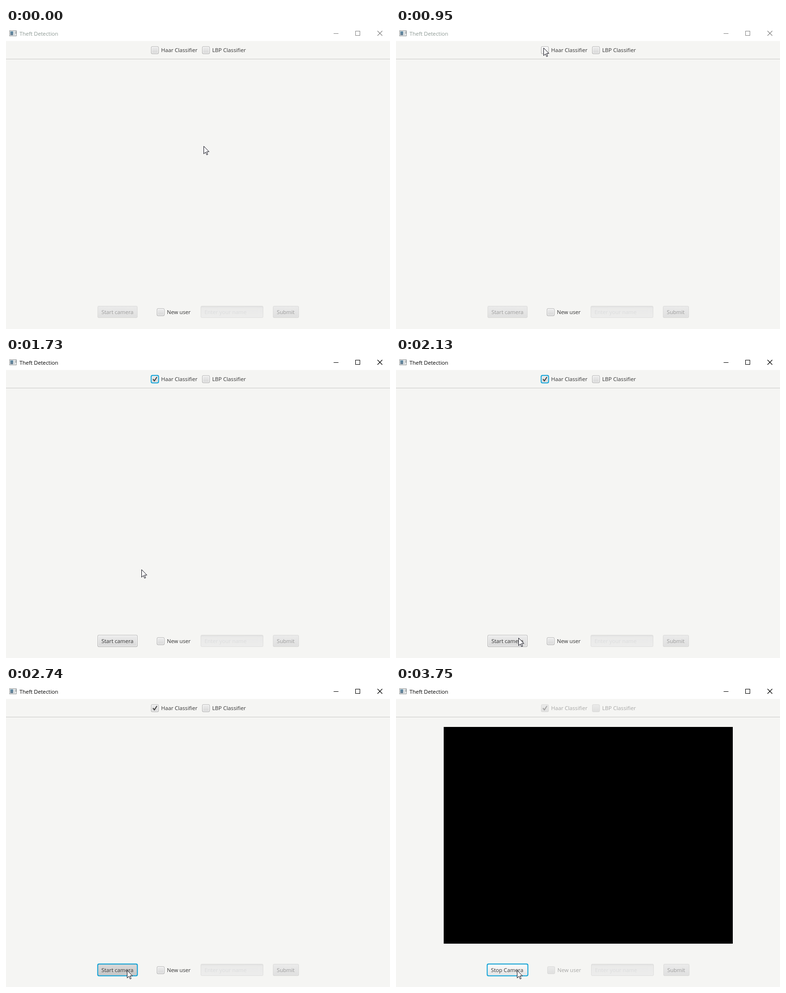
Animation, 797 px wide and 625 px high, one loop 3830 ms. Source, as an HTML page with a canvas:

```html
<!DOCTYPE html>
<html lang="en">
<head>
<meta charset="utf-8">
<title>Theft Detection</title>
<style>
html, body { margin: 0; width: 100%; height: 100%; overflow: hidden; background: #f5f5f3; }
canvas { display: block; }
</style>
</head>
<body>
<canvas id="stage" width="797" height="625"></canvas>
<script>
const ctx = document.getElementById('stage').getContext('2d');
const LOOP = 3830;
const FONT = '11.2px "Open Sans", "Noto Sans", sans-serif';
const INK = '#333333';
const FOCUS = '#0a9fd4';

// Pointer samples: start time, x, y
const POINTER = [
  [0, 410, 245], [80, 405, 234], [160, 387, 196], [230, 360, 142],
  [310, 331, 88], [390, 314, 53], [470, 308, 39],
  [870, 307, 40], [950, 306, 41],
  [1420, 303, 62], [1500, 288, 150], [1570, 275, 268], [1650, 276, 368],
  [1730, 281, 441], [1810, 281, 483], [1890, 279, 508],
  [1970, 272, 539], [2050, 262, 566], [2130, 254, 583], [2200, 251, 590]
];

function pointerAt(t) {
  let spot = POINTER[0];
  for (const p of POINTER) if (p[0] <= t) spot = p;
  return { x: spot[1], y: spot[2] };
}

function text(str, x, y, color = INK) {
  ctx.font = FONT;
  ctx.fillStyle = color;
  ctx.fillText(str, x, y);
}

function line(color, width, points) {
  ctx.strokeStyle = color;
  ctx.lineWidth = width;
  ctx.beginPath();
  points.forEach(([x, y]) => ctx.lineTo(x, y));
  ctx.stroke();
}

function roundBox(x, y, w, h, r, fill) {
  ctx.fillStyle = fill;
  ctx.beginPath();
  ctx.roundRect(x, y, w, h, r);
  ctx.fill();
}

function shade(y, h, top, bottom) {
  const g = ctx.createLinearGradient(0, y, 0, y + h);
  g.addColorStop(0, top);
  g.addColorStop(1, bottom);
  return g;
}

function faded(off, draw) {
  ctx.globalAlpha = off ? 0.4 : 1;
  draw();
  ctx.globalAlpha = 1;
}

// Shared bevelled body of buttons and check boxes
function bevel(x, y, w, h, { focus, hover, pressed }) {
  if (focus) {
    roundBox(x - 1, y - 1, w + 2, h + 2, 4, 'rgba(3,158,211,0.35)');
    roundBox(x - 0.4, y - 0.4, w + 0.8, h + 0.8, 3.4, FOCUS);
  } else {
    roundBox(x, y, w, h, 3, shade(y, h, '#bababa', '#a6a6a6'));
  }
  const inset = focus ? 1.3 : 1;
  roundBox(x + inset, y + inset, w - 2 * inset, h - 2 * inset, 2,
    pressed ? '#d2d2d2' : '#fbfbfb');
  const [top, bottom] = pressed ? ['#d9d9d9', '#c6c6c6']
    : hover ? ['#fafafa', '#e5e5e5'] : ['#ececec', '#d9d9d9'];
  roundBox(x + 2, y + 2, w - 4, h - 4, 1.5, shade(y + 2, h - 4, top, bottom));
}

function button(label, x, w, look) {
  faded(look.off, () => {
    bevel(x, 577, w, 25, look);
    text(label, x + 8, 594);
  });
}

function checkBox(label, x, y, look = {}) {
  faded(look.off, () => {
    bevel(x, y, 16, 16, look);
    if (look.checked) {
      line('#444444', 2, [[x + 4, y + 8], [x + 7, y + 11.5], [x + 12.3, y + 3.5]]);
    }
    text(label, x + 21, y + 12);
  });
}

function nameField(x) {
  faded(true, () => {
    roundBox(x, 577, 130, 25, 3, shade(577, 25, '#b4b4b4', '#c2c2c2'));
    roundBox(x + 1, 578, 128, 23, 2, shade(578, 4, '#eeeeee', '#ffffff'));
  });
  text('Enter your name', x + 8, 594, '#dcdddd');
}

function titleBar(active) {
  ctx.fillStyle = '#ffffff';
  ctx.fillRect(0, 0, 797, 27);
  ctx.fillStyle = '#8c9092';
  ctx.fillRect(7, 5, 15, 12);
  ctx.fillStyle = '#f4f6f6';
  ctx.fillRect(8, 6, 13, 10);
  ctx.fillStyle = shade(7, 8, '#5d8ba6', '#6a7f91');
  ctx.fillRect(9, 7, 6, 8);
  ctx.fillStyle = '#d3d7d8';
  ctx.fillRect(16, 7, 3, 8);
  ctx.fillStyle = '#7f898e';
  ctx.fillRect(20, 7, 1, 5);

  text('Theft Detection', 28, 16, active ? '#000000' : '#8d9994');
  const mark = active ? '#000000' : '#858585';
  line(mark, 1, [[680, 11.5], [690, 11.5]]);
  ctx.strokeRect(725.5, 6.5, 9, 9);
  line(mark, 1.1, [[771, 6], [781, 16]]);
  line(mark, 1.1, [[781, 6], [771, 16]]);
}

function clickSpot({ x, y }) {
  ctx.fillStyle = 'rgba(248,236,40,0.62)';
  ctx.beginPath();
  ctx.arc(x, y, 12, 0, Math.PI * 2);
  ctx.fill();
}

function arrow({ x, y }) {
  const outline = new Path2D(
    'M.5 .5V16.3L4.2 12.8L6.6 18.4L8.8 17.5L6.5 11.9H11.5Z');
  ctx.save();
  ctx.translate(x, y);
  ctx.fillStyle = '#ffffff';
  ctx.fill(outline);
  ctx.strokeStyle = '#11111c';
  ctx.lineWidth = 1;
  ctx.stroke(outline);
  ctx.restore();
}

function draw(t) {
  const within = (from, to) => t >= from && t < to;
  const active = t >= 1100;
  const checked = t >= 1180;
  const running = t >= 3060;
  const shift = running ? 1 : 0;
  const pointer = pointerAt(t);

  ctx.fillStyle = '#f5f5f3';
  ctx.fillRect(0, 0, 797, 625);
  titleBar(active);
  ctx.fillStyle = '#cacac8';
  ctx.fillRect(0, 64, 797, 1);

  checkBox('Haar Classifier', 301, 38, {
    checked, off: running,
    focus: within(1100, 2580), hover: within(470, 1420)
  });
  checkBox('LBP Classifier', 407, 38, { off: running });

  if (t >= 3750) {
    ctx.fillStyle = '#000000';
    ctx.fillRect(99, 85, 600, 450);
  }

  if (running) button('Stop Camera', 189, 85, { focus: true, hover: true });
  else button('Start camera', 190, 83, {
    off: !checked, focus: t >= 2580, pressed: t >= 2580
  });
  checkBox('New user', 313 + shift, 582, { off: running });
  nameField(404 + shift);
  button('Submit', 554 + shift, 54, { off: true });

  if (within(1100, 1260) || within(2580, 2740)) clickSpot(pointer);
  arrow(pointer);
}

function tick() {
  draw(performance.now() % LOOP);
  requestAnimationFrame(tick);
}
tick();
</script>
</body>
</html>
```
